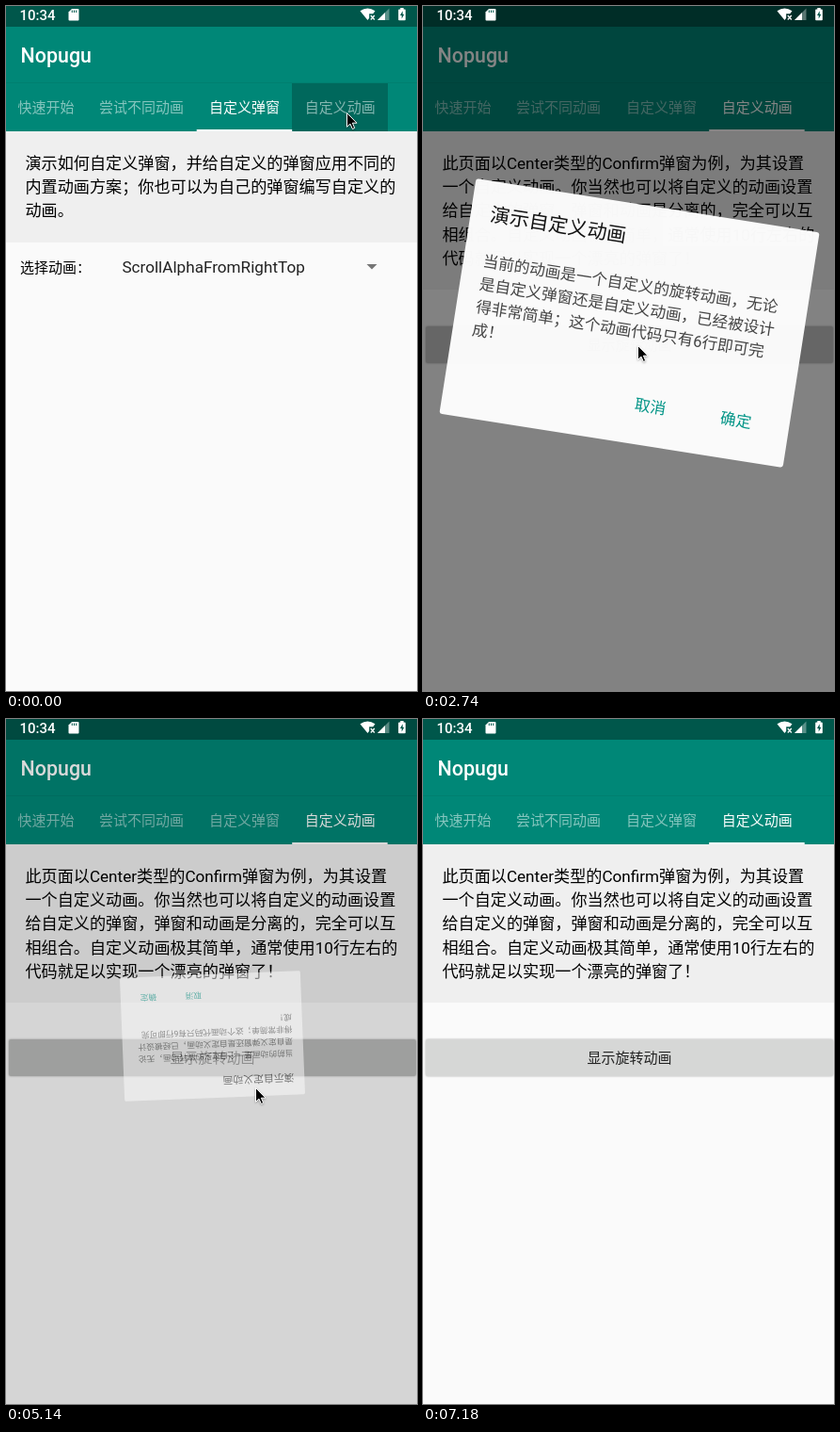
Write an HTML page that moves like this. It is 437 px wide and 727 px high and loops after 7.56 s.

```html
<!DOCTYPE html>
<html lang="zh-CN">
<head>
<meta charset="utf-8">
<title>Popup demo</title>
<style>
  html, body { margin: 0; width: 100%; height: 100%; overflow: hidden; background: #fafafa; }
  svg { display: block; width: 100%; height: 100%; }
  text { font-family: Roboto, "Noto Sans CJK SC", "Noto Sans CJK", sans-serif; white-space: pre; }
  .para { font-size: 17.14px; }
  .small { font-size: 15px; }
  .title { font-size: 21.43px; }
  .bold { font-weight: 500; }
  .mid { text-anchor: middle; }
</style>
</head>
<body>
<svg viewBox="0 0 437 727" xmlns="http://www.w3.org/2000/svg">
  <defs>
    <clipPath id="buttonClip"><rect x="440" y="340" width="433" height="39" rx="2"/></clipPath>
  </defs>

  <rect width="437" height="727" fill="#fafafa"/>

  <g id="pages">
    <rect y="133" width="437" height="118" fill="#efefef"/>
    <g id="intro" class="para" fill="#000"></g>
    <text class="small" x="15" y="282.6" fill="#000">选择动画：</text>
    <text class="para" x="123.4" y="283" fill="#222">ScrollAlphaFromRightTop</text>
    <path d="M383.5 274h11l-5.5 5.5z" fill="#757575"/>

    <rect x="437" y="133" width="437" height="168" fill="#efefef"/>
    <g id="about" class="para" fill="#000"></g>
    <rect x="440" y="340" width="433" height="39" rx="2" fill="#d6d7d6"
      style="filter:drop-shadow(0 .6px 1.2px rgba(0,0,0,.3))"/>
    <g clip-path="url(#buttonClip)"><circle id="ripple" cx="661.5" cy="359.5"/></g>
    <text class="small mid" x="656.6" y="364.8" fill="#222">显示旋转动画</text>
  </g>

  <rect width="437" height="133" fill="#008777"/>
  <rect width="437" height="22" fill="#00574b"/>
  <rect y="81" width="437" height="1" opacity=".06"/>
  <text class="title bold" x="15.6" y="60.3" fill="#fff">Nopugu</text>
  <rect id="pressed" x="304" y="82" width="102" height="51"/>
  <g id="tabs" class="small" fill="#fff"></g>
  <rect id="bar" y="131" width="101.5" height="2" fill="#fff"/>

  <rect id="shade" width="437" height="727"/>

  <g id="dialog">
    <rect x="30" y="207" width="379" height="259" rx="3" fill="#fdfdfd"/>
    <text class="title" x="51.4" y="250.5" fill="#111">演示自定义动画</text>
    <g id="message" class="para" fill="#444"></g>
    <g class="para mid" fill="#009688">
      <text x="256" y="429">取消</text>
      <text x="350.5" y="429">确定</text>
    </g>
  </g>

  <g fill="#fff">
    <text class="bold" x="14.4" y="15.3" font-size="15">10:34</text>
    <path d="M70 3h6.5q1 0 1 1v10.5q0 1-1 1h-9q-1 0-1-1v-8z"/>
    <path d="M70.3 4.5v2.5M72.5 4.5v2.5M74.7 4.5v2.5" stroke="#00574b" stroke-width="1"/>
    <path d="M376.5 5.2q8-5.6 16 0l-2.3 3h-4v4.6l-1.7 2.2z"/>
    <path d="M387.8 10l4 4.5m0-4.5l-4 4.5" stroke="#fff" stroke-width="1.3"/>
    <path d="M407.5 2.5v12.5h-12.5z" opacity=".35"/>
    <path d="M403 7v8h-8z"/>
    <path d="M419.3 3.5v-1.5h3.4v1.5h1.3q.8 0 .8.8v10.2q0 .8-.8.8h-6q-.8 0-.8-.8v-10.2q0-.8.8-.8z"/>
    <path d="M421.7 5.3l-2.7 4.7h1.7v3.5l2.7-4.7h-1.7z" fill="#00574b"/>
  </g>

  <path id="cursor" d="M.5 .5V15.3L4 12.2L6.4 17.5L8.7 16.5L6.4 11.2H11z" fill="#000" stroke="#fff"
    style="filter:drop-shadow(0 1px .8px rgba(0,0,0,.3))"/>
</svg>

<script>
const LOOP = 7560;
const DURATION = 350;
const $ = id => document.getElementById(id);

// Moments at which the screen refreshes: [first, last, count]
const REFRESH = [
  [0, 0, 1], [90, 360, 4], [540, 1240, 9], [1330, 1940, 8], [2470, 2920, 6], [3100, 3360, 4],
  [3810, 4510, 9], [4600, 4690, 2], [5050, 5590, 7], [5770, 5940, 3], [6390, 7100, 9], [7180, 7180, 1]
];

// Pointer path: [time, x, y]
const PATH = [
  [0, 362, 113], [450, 362, 113], [1240, 194, 281], [1330, 165, 235], [1420, 134, 187],
  [1510, 117, 200], [1680, 150, 290], [1940, 228, 360], [3010, 228, 360], [3360, 239, 481],
  [3810, 239, 481], [4160, 247, 458], [4510, 260, 385], [4690, 261, 374], [4960, 261, 374],
  [5140, 265, 391], [5590, 254, 531], [5940, 252, 543], [6390, 252, 543], [7100, 375, 714]
];
const POINTER_END = 7180;

const TAB_START = 60;
const PRESSES = [2470, 5050];
const POPUPS = [{ show: 2460, hide: 3791 }, { show: 5016.6, hide: 6369 }];

const clamp = v => Math.min(1, Math.max(0, v));
const mix = (a, b, p) => a + (b - a) * p;
const span = (t, start, length) => clamp((t - start) / length);
const smooth = p => (1 - Math.cos(Math.PI * p)) / 2;
const quintOut = p => 1 - (1 - p) ** 5;

// cubic-bezier(.4, 0, .2, 1)
function fastOutSlowIn(x) {
  let lo = 0, hi = 1;
  for (let i = 0; i < 24; i++) {
    const s = (lo + hi) / 2, r = 1 - s;
    if (1.2 * s * r * r + 0.6 * s * s * r + s ** 3 < x) lo = s; else hi = s;
  }
  return x >= 1 ? 1 : x <= 0 ? 0 : lo * lo * (3 - 2 * lo);
}

function addText(parent, x, y, content) {
  const node = document.createElementNS("http://www.w3.org/2000/svg", "text");
  node.setAttribute("x", x);
  node.setAttribute("y", y);
  node.textContent = content;
  parent.append(node);
  return node;
}

function addLines(id, x, y, step, lines) {
  lines.forEach((line, i) => addText($(id), x, y + i * step, line));
}

function set(id, attrs) {
  for (const key in attrs) $(id).setAttribute(key, attrs[key]);
}

addLines("intro", 20.4, 173.2, 25.1, [
  "演示如何自定义弹窗，并给自定义的弹窗应用不同的",
  "内置动画方案；你也可以为自己的弹窗编写自定义的",
  "动画。"
]);
addLines("about", 457.4, 173.2, 25.1, [
  "此页面以Center类型的Confirm弹窗为例，为其设置",
  "一个自定义动画。你当然也可以将自定义的动画设置",
  "给自定义的弹窗，弹窗和动画是分离的，完全可以互",
  "相组合。自定义动画极其简单，通常使用10行左右的",
  "代码就足以实现一个漂亮的弹窗了！"
]);
addLines("message", 51.4, 300.4, 25.1, [
  "当前的动画是一个自定义的旋转动画，无论",
  "是自定义弹窗还是自定义动画，已经被设计",
  "得非常简单；这个动画代码只有6行即可完",
  "成！"
]);
const tabs = [[12.5, "快速开始"], [99, "尝试不同动画"], [216, "自定义弹窗"], [317.7, "自定义动画"]]
  .map(([x, label]) => addText($("tabs"), x, 112.8, label));

function lastRefresh(t) {
  let last = 0;
  for (const [first, end, count] of REFRESH) {
    if (first > t) break;
    const gap = count > 1 ? (end - first) / (count - 1) : 1;
    last = first + Math.min(count - 1, Math.floor((t - first) / gap + 1e-6)) * gap;
  }
  return last;
}

function pointerAt(t) {
  const i = PATH.findIndex(k => k[0] > t);
  if (i < 0) return PATH[PATH.length - 1].slice(1);
  const a = PATH[i - 1], b = PATH[i], p = span(t, a[0], b[0] - a[0]);
  return [mix(a[1], b[1], p), mix(a[2], b[2], p)];
}

function drawTabs(t) {
  const moved = fastOutSlowIn(span(t, TAB_START, 300));
  const active = t < TAB_START ? 2 : 3;
  tabs.forEach((tab, i) => tab.setAttribute("opacity", i === active ? 1 : 0.52));
  set("bar", { x: mix(202.7, 304.2, moved) });
  set("pressed", { opacity: 0.23 * (1 - span(t, TAB_START, 300)) });
  set("pages", { transform: `translate(${-437 * quintOut(span(t, TAB_START, 200))} 0)` });
}

function drawRipple(t) {
  const age = t - (PRESSES.filter(p => p <= t).pop() ?? -1e4);
  set("ripple", { r: 181 + Math.min(age, 90), opacity: 0.13 * (1 - span(age, 180, 240)) });
}

function drawPopup(t) {
  const { show, hide } = POPUPS.filter(p => p.show <= t).pop() ?? { show: LOOP, hide: LOOP };
  const shown = span(t, show, DURATION), hidden = span(t, hide, DURATION);
  const open = fastOutSlowIn(shown) - fastOutSlowIn(hidden);
  set("shade", { opacity: 0.533 * (smooth(shown) - smooth(hidden)) });
  set("dialog", {
    opacity: open,
    visibility: open > 0 ? "visible" : "hidden",
    transform: `translate(219.5 336.5) rotate(${360 * (1 - open)}) scale(${open}) translate(-219.5 -336.5)`
  });
}

function draw(time) {
  const t = lastRefresh(time);
  drawTabs(t);
  drawRipple(t);
  drawPopup(t);
  const [x, y] = pointerAt(t);
  set("cursor", {
    transform: `translate(${x} ${y})`,
    visibility: t < POINTER_END ? "visible" : "hidden"
  });
}

const start = performance.now();
function tick() {
  draw((performance.now() - start) % LOOP);
  requestAnimationFrame(tick);
}
tick();
</script>
</body>
</html>
```
